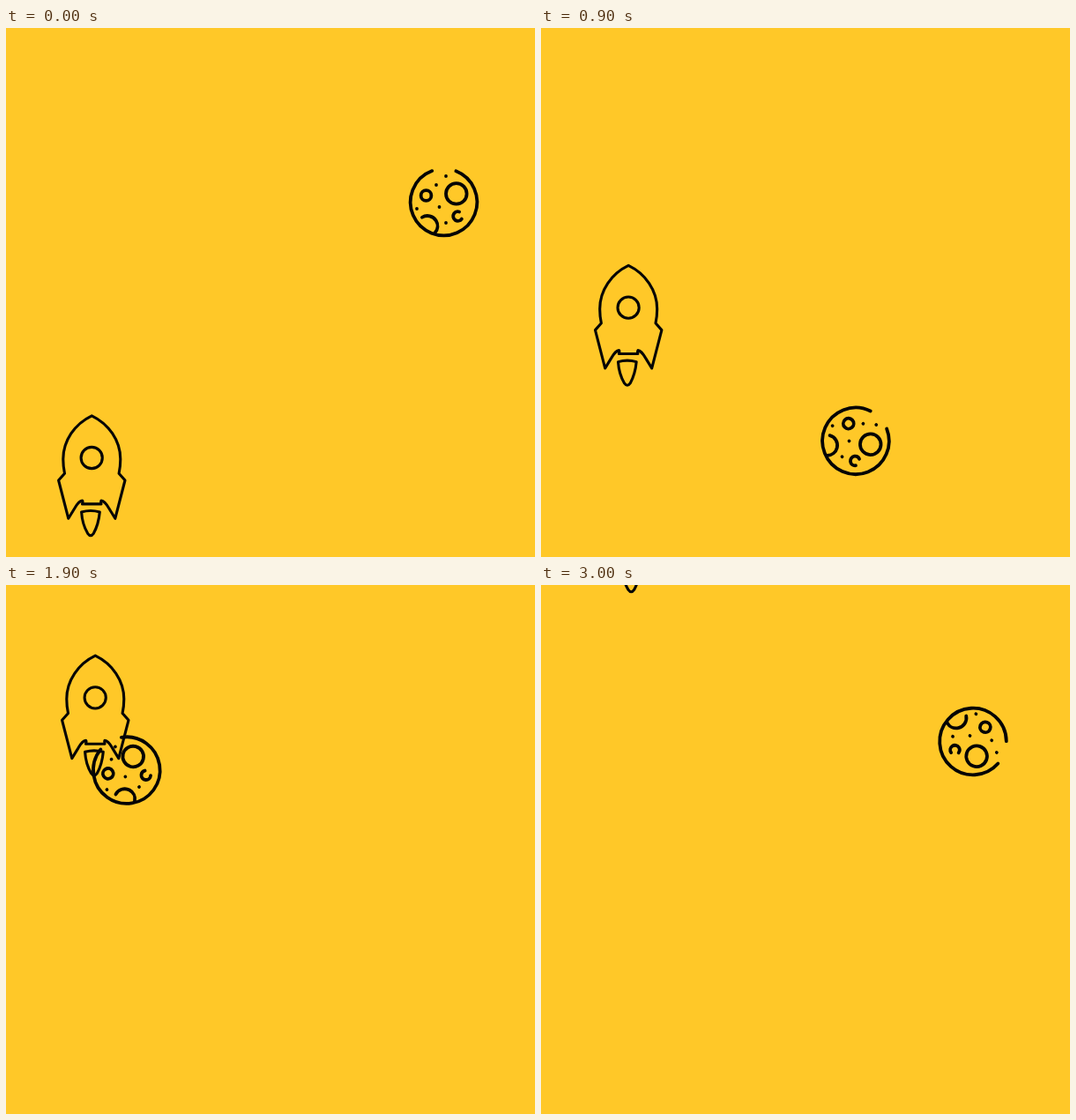
These frames come from a looping animation (600x600 px, 3.1 s). An HTML page with a canvas:

```html
<!DOCTYPE html>
<html lang="en">
<head>
<meta charset="utf-8">
<title>Rocket and moon</title>
<style>
  html, body { margin: 0; width: 100%; height: 100%; overflow: hidden; background: #ffc828; }
  canvas { display: block; width: 600px; height: 600px; }
</style>
</head>
<body>
<canvas id="stage" width="600" height="600"></canvas>
<script>
const ctx = document.getElementById('stage').getContext('2d');
const STEP = 100, STEPS = 31;
const INK = '#050505', SKY = '#ffc828';
const RAD = Math.PI / 180;

// Moon poses at even intervals around its orbit; the last one meets the first
const KEY_GAP = 5;
const poses = [
  { x: 496.5, y: 197.5, turn: 0 },
  { x: 499, y: 372, turn: 266.5 },
  { x: 318, y: 476, turn: 443 },
  { x: 139.7, y: 392, turn: 655 },
  { x: 153.7, y: 176.4, turn: 707 },
  { x: 339.4, y: 140.7, turn: 912.5 },
  { x: 490, y: 177.5, turn: 1190 }
];
const last = poses.length - 1;

function poseValue(name, i) {
  const lap = name === 'turn' ? poses[last].turn : 0;
  if (i < 0) return poses[i + last][name] - lap;
  if (i > last) return poses[i - last][name] + lap;
  return poses[i][name];
}

// Catmull-Rom spline through the poses
function glide(name, n) {
  const i = Math.min(Math.floor(n / KEY_GAP), last - 1);
  const u = n / KEY_GAP - i, v = 1 - u;
  const [a, b, c, d] = [-1, 0, 1, 2].map(k => poseValue(name, i + k));
  return v * v * (1 + 2 * u) * b + u * u * (3 - 2 * u) * c
    + u * v * (v * (c - a) - u * (d - b)) / 2;
}

function arc(x, y, r, from = 0, to = 360) {
  ctx.beginPath();
  ctx.arc(x, y, r, from * RAD, to * RAD);
  ctx.stroke();
}

const body = new Path2D(`M97.3 439.8 C116.5 449 129.8 468 129.8 489
  C129.8 495 129.2 500 128.1 505.2 L135 513 L123.8 556.3 L116.6 544.5
  Q112 536.5 108 536 Q107.2 537 108 539.9 H86.5 Q87.5 537 86.6 536
  Q82.5 536.5 78 544.5 L70.8 556.3 L59.6 513 L66.5 505.2
  C65.4 500 64.8 495 64.8 489 C64.8 468 78 449 97.3 439.8 Z`);
const flame = new Path2D(`M85.6 549 Q96 546 106.3 549 Q105 563 99.3 573.3
  Q96 578 92.7 573.3 Q86.5 563 85.6 549 Z`);
// Zero-length strokes with round caps
const dots = new Path2D('M2.5 -29.5h0 M-8.5 -19.5h0 M-5 5.5h0 M-30.5 7.5h0 M2.5 23.5h0');

function drawRocket(n) {
  ctx.save();
  ctx.translate(0.21 * n, -18.93 * n);
  ctx.lineWidth = 3.1;
  ctx.stroke(body);
  ctx.stroke(flame);
  arc(97.2, 487.5, 12.1);
  ctx.restore();
}

function drawMoon(n) {
  ctx.save();
  ctx.translate(glide('x', n), glide('y', n));
  ctx.rotate(glide('turn', n) * RAD);
  ctx.lineWidth = 3.8;
  arc(0, 0, 37.8, -68.5, 249.5);
  arc(14.3, -9.6, 11.8);
  arc(-20, -7.5, 5.9);
  arc(16, 16, 5.3, 35, 288);
  arc(-18.5, 27, 11.5, -122, 42);
  ctx.stroke(dots);
  ctx.restore();
}

function draw(n) {
  ctx.fillStyle = SKY;
  ctx.fillRect(0, 0, 600, 600);
  ctx.strokeStyle = INK;
  ctx.lineCap = ctx.lineJoin = 'round';
  drawRocket(n);
  drawMoon(n);
}

const start = performance.now();
function tick() {
  draw(Math.floor((performance.now() - start) / STEP) % STEPS);
  requestAnimationFrame(tick);
}
tick();
</script>
</body>
</html>
```
